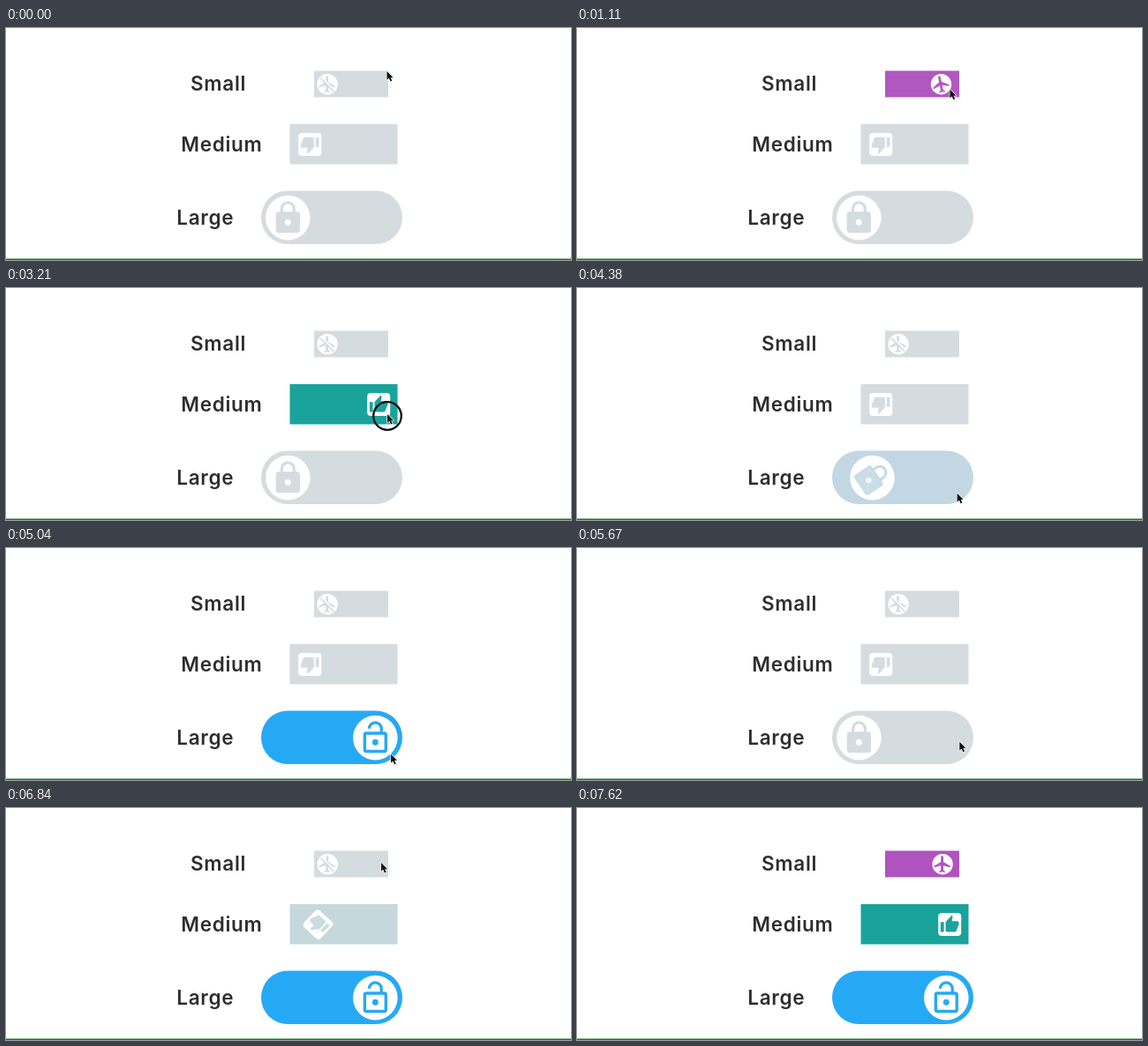
Recreate the animation shown at these times as an HTML page with a canvas. Size 640 px wide and 263 px high, loop 7.65 s.

```html
<!DOCTYPE html>
<html lang="en">
<head>
<meta charset="utf-8">
<title>Rolling switches</title>
<style>
  html, body { margin: 0; width: 100%; height: 100%; overflow: hidden; background: #0c7d12; }
  canvas { display: block; width: 640px; height: 263px; }
</style>
</head>
<body>
<canvas id="stage"></canvas>
<script>
const LOOP = 7650, ROLL = 460, TAP_DELAY = 250, RING = 120;
const OFF = [213, 220, 224];
const canvas = document.getElementById('stage');
const ctx = canvas.getContext('2d');
const dpr = window.devicePixelRatio || 1;
canvas.width = 640 * dpr;
canvas.height = 263 * dpr;

const lerp = (a, b, p) => a + (b - a) * p;
const smooth = v => { const p = Math.max(0, Math.min(1, v)); return p * p * (3 - 2 * p); };

// Pointer stops; those naming a switch click it
const stops = [
  { t: 0, x: 431.5, y: 49 },
  { t: 450, x: 415, y: 54, hit: 'Small' },
  { t: 1400, x: 424.5, y: 74, hit: 'Small' },
  { t: 2465, x: 430, y: 138, hit: 'Medium' },
  { t: 3230, x: 432, y: 143, hit: 'Medium' },
  { t: 4017, x: 428, y: 232, hit: 'Large' },
  { t: 4970, x: 436, y: 234, hit: 'Large' },
  { t: 5850, x: 433, y: 218, hit: 'Large' },
  { t: 6492, x: 425, y: 115, hit: 'Medium' },
  { t: 6575, x: 424.5, y: 62, hit: 'Small' },
  { t: 6900, x: 425, y: 62 },
  { t: 7250, x: 575, y: 56 }
];

const switches = [
  { label: 'Small', textX: 209, left: 349, cy: 63.5, on: [175, 83, 190],
    knob: 11.7, travel: 50, iconSize: 22.8, drawIcon: plane },
  { label: 'Medium', textX: 198.3, left: 321.5, cy: 131.8, on: [26, 163, 155],
    knob: 13, travel: 78, iconSize: 22.5, drawIcon: thumb },
  { label: 'Large', textX: 193.3, left: 289, cy: 214.8, on: [38, 169, 245],
    knob: 25.3, travel: 99, iconSize: 41, drawIcon: lock, pill: true }
];

// Icons are drawn on a 24-unit grid in the current colour
const wings = new Path2D('M11.5 8.2L21 14V16L11.5 13L2 16V14ZM11.5 18L15 20.5V22L11.5 21L8 22V20.5Z');
const hand = new Path2D('M1 9H5V21H1ZM7 9L14.2 1L15.6 2.4L14.7 8H21Q23 8 23 10V12L19.8 19.8Q19.3 21 18 21H9Q7 21 7 19Z');
const arrow = new Path2D('M0 0V11.6L2.7 9.2L4.7 13.6L6.8 12.7L4.9 8.4H8.4Z');

function line(x1, y1, x2, y2, width) {
  ctx.lineWidth = width;
  ctx.beginPath();
  ctx.moveTo(x1, y1);
  ctx.lineTo(x2, y2);
  ctx.stroke();
}

function plane(on, color) {
  ctx.lineCap = 'round';
  line(11.5, 3.5, 11.5, 19, 3);
  ctx.fill(wings);
  if (on) return;
  ctx.lineCap = 'butt';
  ctx.strokeStyle = '#fff';
  line(4.9, 3.4, 20.6, 19.1, 1.8);
  ctx.strokeStyle = color;
  line(3.6, 4.6, 19.4, 20.4, 1.8);
}

function thumb(on) {
  if (!on) {
    ctx.translate(24, 24);
    ctx.rotate(Math.PI);
  }
  ctx.fill(hand);
}

function lock(on) {
  ctx.lineWidth = 1.9;
  ctx.beginPath();
  if (!on) ctx.moveTo(7.95, 8.5);
  ctx.arc(12, 6, 4.05, Math.PI, 0);
  ctx.lineTo(16.05, 8.5);
  ctx.stroke();
  ctx.beginPath();
  ctx.roundRect(4, 8, 16, 14, 2);
  if (on) ctx.rect(6, 10, 12, 10);
  ctx.fill('evenodd');
  ctx.beginPath();
  ctx.arc(12, 15, 2, 0, 2 * Math.PI);
  if (!on) ctx.fillStyle = '#fff';
  ctx.fill();
}

function progress(label, t) {
  return stops.filter(s => s.hit === label).reduce((p, click, i) => {
    const rolled = smooth((t - click.t - TAP_DELAY) / ROLL);
    return rolled ? lerp(i % 2, 1 - i % 2, rolled) : p;
  }, 0);
}

function roundBox(x, y, w, h, r) {
  ctx.beginPath();
  ctx.roundRect(x, y, w, h, r);
  ctx.fill();
}

function drawSwitch(s, size, t) {
  const p = progress(s.label, t), k = s.knob;
  const width = 84 + 38 * size, height = 30.2 + 15.2 * size;
  const tint = p ** 1.2;
  const color = `rgb(${OFF.map((c, i) => Math.round(lerp(c, s.on[i], tint)))})`;

  ctx.fillStyle = '#2e2e30';
  ctx.fillText(s.label, s.textX, s.cy + 7.7);
  ctx.fillStyle = color;
  roundBox(s.left, s.cy - height / 2, width, height, s.pill ? height / 2 : 0);

  ctx.save();
  ctx.translate(s.left + height / 2 + s.travel * p, s.cy + 0.3);
  ctx.rotate(p * 2 * Math.PI);
  ctx.fillStyle = '#fff';
  roundBox(-k, -k, 2 * k, 2 * k, size === 1 ? 4 : k);
  ctx.scale(s.iconSize / 24, s.iconSize / 24);
  ctx.translate(-12, -12);
  for (const on of [false, true]) {
    ctx.save();
    ctx.globalAlpha = on ? p : 1 - p;
    ctx.fillStyle = ctx.strokeStyle = color;
    s.drawIcon(on, color);
    ctx.restore();
  }
  ctx.restore();
}

function drawPointer(t) {
  const next = stops.findIndex(s => s.t > t);
  if (next < 0) return;
  const a = stops[next - 1], b = stops[next];
  const p = smooth((t - a.t) / (b.t - a.t));

  ctx.save();
  ctx.translate(lerp(a.x, b.x, p), lerp(a.y, b.y, p));
  if (stops.some(s => s.hit && Math.abs(t - s.t) < RING / 2)) {
    ctx.beginPath();
    ctx.arc(0, 2, 15.8, 0, 2 * Math.PI);
    ctx.strokeStyle = '#111';
    ctx.lineWidth = 2.3;
    ctx.stroke();
  }
  ctx.scale(0.85, 0.85);
  ctx.lineJoin = 'round';
  ctx.strokeStyle = '#fff';
  ctx.lineWidth = 1.6;
  ctx.stroke(arrow);
  ctx.fillStyle = '#111';
  ctx.fill(arrow);
  ctx.restore();
}

function draw(t) {
  ctx.setTransform(dpr, 0, 0, dpr, 0, 0);
  ctx.fillStyle = '#fff';
  ctx.fillRect(0, 0, 640, 263);
  ctx.fillStyle = '#0c7d12';
  ctx.fillRect(0, 261.5, 640, 1.5);
  ctx.font = '600 22.5px Inter, sans-serif';
  ctx.letterSpacing = '0.7px';
  switches.forEach((s, size) => drawSwitch(s, size, t));
  drawPointer(t);
}

const begin = performance.now();
function tick() {
  draw((performance.now() - begin) % LOOP);
  requestAnimationFrame(tick);
}
tick();
</script>
</body>
</html>
```
